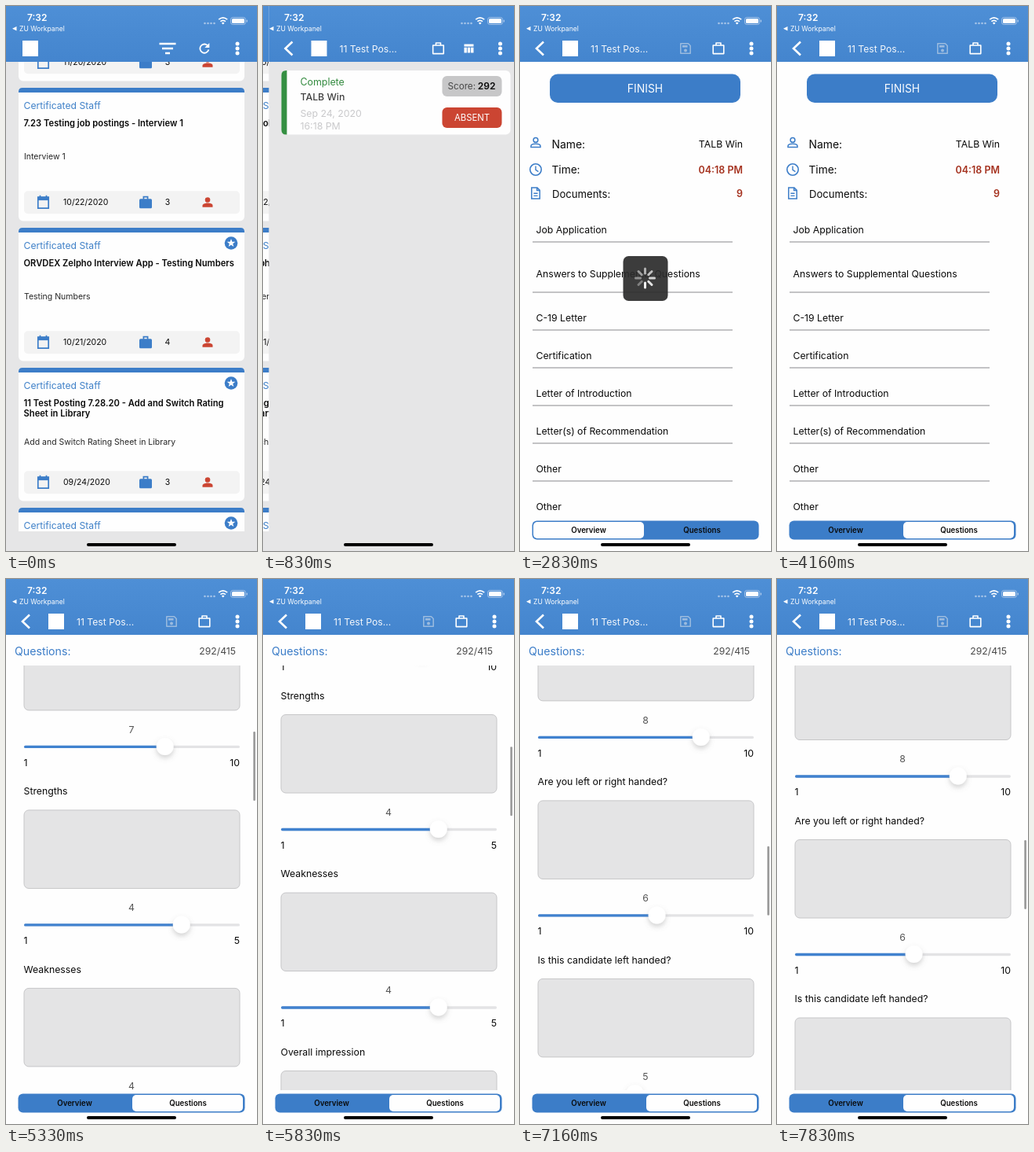
An HTML page for the animation above (8000 ms loop, 320 px wide and 693 px high).

```html
<!DOCTYPE html>
<html lang="en">
<head>
<meta charset="utf-8">
<title>Interview app</title>
<style>
html, body { margin: 0; width: 100%; height: 100%; overflow: hidden; background: #fefefe; }
svg { display: block; width: 100vw; height: 100vh; }
text { font-family: Inter, "Liberation Sans", sans-serif; white-space: pre; }
</style>
</head>
<body>
<svg id="stage" viewBox="0 0 320 693" xmlns="http://www.w3.org/2000/svg"></svg>
<script>
const LOOP = 8000, STEPS_PER_MS = 0.006;
const BLUE = '#3c7dc8', PAPER = '#fefefe', GREY = '#e6e6e7', RED = '#cb4532', DARK_RED = '#a5321f', INK = '#0a0a0a';

// Markup helpers
const rect = (x, y, w, h, fill, r = 0, more = '') =>
  `<rect x="${x}" y="${y}" width="${w}" height="${h}" rx="${r}" fill="${fill}" ${more}/>`;
const circle = (x, y, r, fill, more = '') => `<circle cx="${x}" cy="${y}" r="${r}" fill="${fill}" ${more}/>`;
const line = (d, color, w = 2, more = '') =>
  `<path d="${d}" fill="none" stroke="${color}" stroke-width="${w}" ${more}/>`;
const shape = (d, fill) => `<path d="${d}" fill="${fill}"/>`;
const group = (id, body, more = '') => `<g id="${id}" ${more}>${body}</g>`;
const at = (x, y, body) => `<g transform="translate(${x} ${y})">${body}</g>`;
// y is the middle of the capitals
const label = (x, y, str, size, fill = INK, weight = 400, anchor = 'start') =>
  `<text x="${x}" y="${(y + size * 0.36).toFixed(2)}" font-size="${size}" fill="${fill}" ` +
  `font-weight="${weight}" text-anchor="${anchor}">${str}</text>`;

// Icons, centred on 0,0
const icon = {
  dots: () => [-6, 0, 6].map(y => circle(0, y, 2.5, '#fff')).join(''),
  filter: () => line('M-10.5-6H10.5M-7 0H7M-3 6H3', '#fff', 2.3),
  refresh: () => line('M4.2-3.6A5.6 5.6 0 1 0 5.4 1.6', '#fff', 1.8) + shape('M6.3-7V-1H.3Z', '#fff'),
  back: () => line('M5-8.5L-4 0L5 8.5', '#fff', 2.6),
  bag: () => line('M-6.8-4H6.8V6.6H-6.8ZM-3-4V-7H3V-4', '#fff', 1.6, 'stroke-linejoin="round"'),
  table: () => rect(-6, -5.5, 12, 3, '#fff') + [-6, -1.7, 2.6].map(x => rect(x, -1.3, 3.4, 6.8, '#fff')).join(''),
  save: () => `<g opacity=".5">` + line('M-6.2-6.2H3.5L6.2-3.5V6.2H-6.2Z', '#eee', 1.5, 'stroke-linejoin="round"') +
    rect(-4, -4, 6.5, 2.6, '#eee') + circle(0, 2.5, 2, '#eee') + '</g>',
  calendar: () => line('M-6.7-6.5H6.7V7.5H-6.7Z', BLUE, 1.7) + rect(-7, -7, 14, 4.4, BLUE) +
    line('M-4-9V-5M4-9V-5', BLUE, 1.7),
  briefcase: () => rect(-8, -4.5, 16, 12, BLUE, 1.5) + line('M-2.6-4V-7H2.6V-4', BLUE, 1.7),
  person: () => circle(0, -3.2, 3.3, RED) + shape('M-6.5 6V4C-6.5 1.6-2.5 .9 0 .9S6.5 1.6 6.5 4V6Z', RED),
  personLine: () => circle(0, -3.6, 2.9, 'none', `stroke="${BLUE}" stroke-width="1.5"`) +
    line('M-6 5.4V4C-6 2-2.5 1.2 0 1.2S6 2 6 4V5.4Z', BLUE, 1.5),
  clock: () => circle(0, 0, 7.2, 'none', `stroke="${BLUE}" stroke-width="1.6"`) + line('M0-4.4V.4L3.4 2.6', BLUE, 1.4),
  doc: () => line('M-5.2-7H2L5.2-3.8V7H-5.2ZM1.6-7V-3.4H5.2', BLUE, 1.5) + line('M-2.6 .2H2.6M-2.6 3.4H2.6', BLUE, 1.4),
  star: () => {
    const pts = Array.from({ length: 10 }, (_, i) => {
      const r = i % 2 ? 2.3 : 5.6, a = (i / 5 - 0.5) * Math.PI;
      return (r * Math.cos(a)).toFixed(2) + ',' + (r * Math.sin(a)).toFixed(2);
    });
    return circle(0, 0, 8.3, BLUE) + `<polygon points="${pts.join(' ')}" fill="#fff"/>`;
  }
};
const put = (name, x, y) => at(x, y, icon[name]());

const header = body => rect(0, 0, 320, 71, 'url(#bar)') + body + put('dots', 295, 54);
const mark = x => rect(x - 10, 44, 20, 20, '#fff');
const subHeader = body => header(put('back', 25, 54) + mark(64) +
  label(90, 54.5, '11 Test Pos...', 12.2, '#f4f7fb') + body);

// Job list
function card(top, titles, sub, date, count, starred) {
  const titleText = titles.map((s, i) => label(22.5, top + 44.5 + i * 13.5, s, 11.2, INK, 600)).join('');
  const mid = top + 145.7;
  return rect(16, top, 288, 169.5, PAPER, 6) +
    shape(`M16 ${top + 6}V${top + 5}Q16 ${top} 21 ${top}H299Q304 ${top} 304 ${top + 5}V${top + 6}Z`, BLUE) +
    label(22.5, top + 23, 'Certificated Staff', 12.2, '#3f80c8') + titleText +
    label(23, top + (titles.length > 1 ? 94 : 87.5), sub, 10.5, '#262626') +
    rect(23, mid - 14.5, 275, 29, '#f3f3f3', 5) +
    put('calendar', 47.5, mid) + label(73, mid, date, 10.5) +
    put('briefcase', 178, mid) + label(206, mid, count, 10.5, INK, 400, 'middle') +
    put('person', 257, mid) + (starred ? put('star', 287, top + 19.5) : '');
}
const listScreen = () => rect(0, 0, 320, 693, GREY) +
  '<g clip-path="url(#listClip)">' +
  card(-74, [''], '', '11/20/2020', 3) +
  card(104, ['7.23 Testing job postings - Interview 1'], 'Interview 1', '10/22/2020', 3) +
  card(282, ['ORVDEX Zelpho Interview App - Testing Numbers'], 'Testing Numbers', '10/21/2020', 4, true) +
  card(460, ['11 Test Posting 7.28.20 - Add and Switch Rating', 'Sheet in Library'],
    'Add and Switch Rating Sheet in Library', '09/24/2020', 3, true) +
  card(638, [''], '', '09/24/2020', 3, true) + '</g>' +
  header(mark(31) + put('filter', 206, 54) + put('refresh', 253, 54));

// Candidate list
const PERSON = 'TALB Win';
const candidateScreen = () => rect(0, 0, 320, 693, GREY) +
  rect(16, 82, 292, 81.5, PAPER, 6) +
  shape('M23 82V163.5H22Q16 163.5 16 157.5V88Q16 82 22 82Z', '#358f42') +
  label(40, 97, 'Complete', 12.4, '#328a3e') + label(40, 116, PERSON, 12.3, '#404040', 500) +
  label(40, 137, 'Sep 24, 2020', 12.3, '#c9c9cb') + label(40, 152.5, '16:18 PM', 12.3, '#c9c9cb') +
  rect(221, 89, 76, 26, '#c7c7c8', 6) + label(228, 102, 'Score:', 11.7, '#484848') +
  label(289, 102, '292', 12, INK, 600, 'end') +
  rect(221, 129, 76, 26, RED, 6) + label(259, 142.2, 'ABSENT', 11.3, '#fff', 400, 'middle') +
  subHeader(put('bag', 216, 54) + put('table', 255, 54));

// Overview tab
const DOCS = [['Job Application', 285, 300], ['Answers to Supplemental Questions', 341, 364],
  ...['C-19 Letter', 'Certification', 'Letter of Introduction', 'Letter(s) of Recommendation', 'Other', 'Other']
    .map((s, i) => [s, 397 + i * 48, 412 + i * 48])];
const overview = () => rect(38, 86.5, 243, 36.5, BLUE, 10) +
  label(159.5, 105, 'FINISH', 13.9, '#fafcff', 400, 'middle') +
  put('personLine', 20, 174) + label(40.5, 175.5, 'Name:', 13.9) + label(284, 175.5, PERSON, 12.3, INK, 400, 'end') +
  put('clock', 20, 208) + label(40.5, 208.5, 'Time:', 13.7) + label(284, 208.5, '04:18 PM', 12.5, DARK_RED, 600, 'end') +
  put('doc', 20, 238) + label(41, 239, 'Documents:', 13.1) + label(284, 238.5, '9', 12.5, DARK_RED, 600, 'end') +
  DOCS.map(([s, y, rule]) => label(20.5, y, s, 12.25) +
    (rule < 650 ? rect(16, rule - 1, 255, 2, '#c3c3c5') : '')).join('');

// Questions tab
const QUESTIONS = [['Experience', 4, 5], ['Education', 3, 5], ['Communication', 7, 10], ['Strengths', 4, 5],
  ['Weaknesses', 4, 5], ['Overall impression', 38, 50], ['Do you like the color red?', 8, 10],
  ['Are you left or right handed?', 6, 10], ['Is this candidate left handed?', 5, 10]];
function question([title, value, max], i) {
  const y = 130 + i * 226.5, knob = 34 + (value - 1) / (max - 1) * 253;
  return label(22.5, y, title, 12.3) +
    rect(23, y + 24, 275, 99.5, '#e4e4e5', 6, 'stroke="#c6c6c8"') +
    label(160, y + 148, value, 12.3, '#555', 400, 'middle') +
    rect(23, y + 168.3, 275, 3.4, '#e3e3e5', 1.7) + rect(23, y + 168.3, knob - 23, 3.4, '#4182cf', 1.7) +
    circle(knob, y + 169.5, 11, '#fff', 'filter="url(#soft)"') +
    label(22.5, y + 190, 1, 12.3) + label(298, y + 190, max, 12.3, INK, 400, 'end');
}
const questions = () => rect(0, 71, 320, 622, PAPER) +
  `<g clip-path="url(#questionClip)">${group('scroller', QUESTIONS.map(question).join(''))}</g>` +
  label(11, 92, 'Questions:', 14.2, BLUE) + label(293, 92, '292/415', 12.2, '#484848', 400, 'end') +
  rect(315.3, 0, 2.6, 88, '#989898', 1.3, 'id="thumb"');

const tabs = () => rect(15.5, 654.5, 289, 24, BLUE, 6) +
  rect(17, 656, 141, 21, PAPER, 5, 'id="pill"') +
  label(87.5, 666.5, 'Overview', 9.7, INK, 600, 'middle') + label(232, 666.5, 'Questions', 9.7, INK, 600, 'middle');

const interviewScreen = () => rect(0, 0, 320, 693, PAPER) +
  group('overview', overview(), 'clip-path="url(#pageClip)"') + group('questions', questions()) + tabs() +
  subHeader(put('save', 211, 54) + put('bag', 253, 54));

// Parts that stay on top of every screen
const statusBar = () => label(27, 14.3, '7:32', 12, '#fff', 600) +
  shape('M8 28.7L13.5 26V31.4Z', '#fff') + label(17, 28.8, 'ZU Workpanel', 8.6, '#fff') +
  [0, 1, 2, 3].map(i => circle(253.5 + i * 4, 22, 1.3, '#a6c4e8')).join('') +
  line('M271.2 17.2Q276.7 12.6 282.2 17.2M273.4 19.7Q276.7 17 280 19.7', '#fff', 1.7) +
  shape('M274.8 21.4Q276.7 20 278.6 21.4L276.7 23.6Z', '#fff') +
  rect(286.5, 14.5, 19, 9, 'none', 2.8, 'stroke="#b6cfec" stroke-width=".8"') +
  rect(288, 16, 16, 6, '#fff', 1.5) + rect(306.6, 17.5, 1.2, 3, '#b6cfec', 0.6);

const spokes = () => Array.from({ length: 8 }, (_, i) =>
  `<path d="M0-6V-12" stroke="#f4f4f4" stroke-width="3" stroke-linecap="round" opacity="${1 - i * 0.09}" ` +
  `transform="rotate(${180 - i * 45})"/>`).join('');
const spinner = () => rect(131.5, 318, 57, 57, '#2c2c2c', 7, 'opacity=".92"') + at(159.5, 346, spokes());

const clip = (id, y, h) => `<clipPath id="${id}">${rect(0, y, 320, h, '#000')}</clipPath>`;

const stage = document.getElementById('stage');
stage.innerHTML = `<defs>
  <linearGradient id="bar" x1="0" y1="0" x2="0" y2="1">
    <stop offset="0" stop-color="#4e8fd6"/><stop offset="1" stop-color="#4485ce"/></linearGradient>
  <filter id="soft" x="-60%" y="-60%" width="220%" height="220%">
    <feDropShadow dx="0" dy="3.5" stdDeviation="3" flood-color="#777" flood-opacity=".32"/></filter>
  ${clip('listClip', 71, 597)}${clip('pageClip', 71, 579)}${clip('questionClip', 110, 540)}
  </defs>` +
  group('list', listScreen()) + group('candidates', candidateScreen()) + group('interview', interviewScreen()) +
  group('spinner', spinner()) + statusBar() + rect(103, 683, 114, 4, '#000', 2);

const part = Object.fromEntries([...stage.querySelectorAll('[id]')].map(el => [el.id, el]));
const span = (n, from, to) => Math.min(1, Math.max(0, (n - from) / (to - from)));
const easeOut = (x, power) => 1 - (1 - x) ** power;
const show = (el, on) => el.setAttribute('display', on ? 'inline' : 'none');
const move = (el, x, y = 0) => el.setAttribute('transform', `translate(${x.toFixed(2)} ${y.toFixed(2)})`);

function push(oldPage, newPage, p) {
  if (p < 1) move(oldPage, -96 * p);
  show(oldPage, p < 1);
  show(newPage, p > 0);
  move(newPage, 320 * (1 - p));
}

function update(time) {
  const n = Math.floor((time % LOOP + 8) * STEPS_PER_MS) % 48;

  push(part.list, part.candidates, easeOut(span(n, 2.5, 6), 3));
  if (n >= 12) push(part.candidates, part.interview, easeOut(span(n, 12.5, 16), 3));
  else show(part.interview, false);

  show(part.spinner, (n >= 6 && n < 12) || (n >= 17 && n < 22));

  const tab = span(n, 23, 25);
  part.pill.setAttribute('x', 17 + 144 * tab);

  const fade = easeOut(span(n, 25, 28), 2);
  show(part.questions, fade > 0);
  part.questions.setAttribute('opacity', fade);

  // Two long flicks, then a short pull back
  const swipe = (from, to) => easeOut(span(n, from, to), 2);
  const scroll = 661 * swipe(28, 35) + 824.5 * swipe(35, 42) - 77.5 * swipe(42, 47);
  move(part.scroller, 0, -scroll);
  show(part.thumb, scroll > 0);
  part.thumb.setAttribute('y', 108.4 + scroll / 6.3);
}

const start = performance.now();
function tick() {
  update(performance.now() - start);
  requestAnimationFrame(tick);
}
tick();
</script>
</body>
</html>
```
